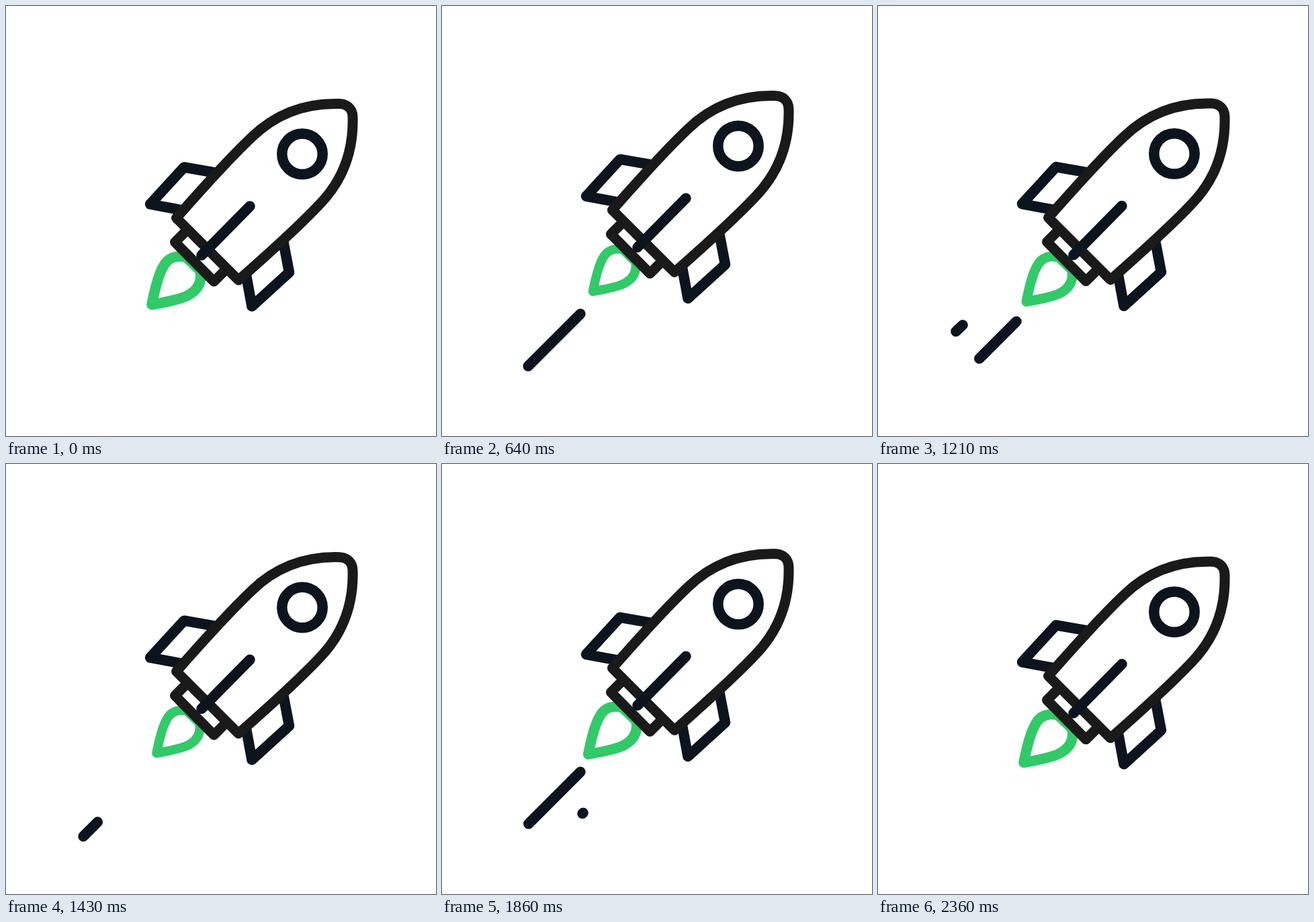
An HTML page that plays this animation: 640 by 640 pixels, repeating every 2430 ms.

```html
<!DOCTYPE html>
<html lang="en">
<head>
<meta charset="utf-8">
<title>Rocket</title>
<style>
html, body { margin: 0; height: 100%; overflow: hidden; background: #fff; }
svg { display: block; width: 100vw; height: 100vh; }
</style>
</head>
<body>
<svg viewBox="0 0 640 640" fill="none" stroke="#0d141e" stroke-width="15.5" stroke-linecap="round" stroke-linejoin="round">
  <g id="rocket">
    <g id="trails"></g>
    <path id="flame" stroke="#32c968" d="M217 444.500C221 424 227 400 234 388C241 374 254 370.500 268 374L289 394C292 410 286 422 272 430C262 436 240 440.500 217 444.500Z"/>
    <path d="M308 247.500L265 240L214.500 295L260 303.500M413 352L421.500 396.500L366 447L357.500 401"/>
    <g stroke="#1a1a1a" stroke-width="15">
      <path fill="#fff" d="M269 334L251.500 351.500L309.500 410L327 392.500"/>
      <path fill="#fff" d="M253.500 315.500C290 274 330 229 366 195C402 160 447 144 497 145.500C508 146 515.500 153.500 516 164.500C517.500 214.500 501.500 259.500 466.500 295.500C432.500 331.500 387.500 371.500 346 408Z"/>
    </g>
    <circle cx="441" cy="220.300" r="30.200"/>
    <path d="M363 298L291 371"/>
  </g>
</svg>
<script>
const LOOP = 2430, STEP = LOOP / 34, BOB = 1200;
const $ = id => document.getElementById(id);
const clamp = v => Math.min(1, Math.max(0, v));
const smooth = x => (1 - Math.cos(Math.PI * x)) / 2;

// each pass: [start in ms, part of the line that is reached]
const trails = [
  { from: [206, 470], to: [115, 561], passes: [[515, 1], [1124, 1], [1731, 1]] },
  { from: [162, 441], to: [98, 502], passes: [[-4, 1], [907, .72], [1455, .72]] },
  { from: [285, 457], to: [209, 532], passes: [[229, 1], [835, 1], [1511, 1], [1940, 1]] }
];
for (const trail of trails) {
  trail.el = document.createElementNS("http://www.w3.org/2000/svg", "path");
  $("trails").append(trail.el);
}

// [time, amount of shrinking]
const flicker = [[600, 1], [1210, .5], [1500, 1], [1900, .06], [2360, 0]];

function lift(t) {
  const p = t % BOB / (BOB / 2);
  return 12 * (p < 1 ? Math.sin(p * Math.PI / 2) : 1 - smooth(p - 1));
}

function shrink(t) {
  if (t < 600) return clamp(t / 480);
  const i = flicker.findIndex(k => k[0] > t);
  if (i < 1) return 0;
  const [t0, a] = flicker[i - 1], [t1, b] = flicker[i];
  return a + (b - a) * smooth((t - t0) / (t1 - t0));
}

function trailPath({ from, to, passes }, t) {
  const pass = passes.find(([start]) => t > start && t < start + 350);
  if (!pass) return "";
  const age = t - pass[0];
  const head = clamp(age / 150) * pass[1];
  const tail = clamp((age - 160) / 190) * pass[1];
  if (head < .05) return "";
  const at = u => from.map((v, i) => v + (to[i] - v) * u);
  return `M${at(tail)}L${at(head)}`;
}

function draw(now) {
  const t = Math.floor((now % LOOP + 5) / STEP) % 34 * STEP;
  $("rocket").setAttribute("transform", `translate(0 ${-lift(t)})`);
  $("flame").setAttribute("transform",
    `translate(279.5 380) scale(${1 - .122 * shrink(t)}) translate(-279.5 -380)`);
  for (const trail of trails) trail.el.setAttribute("d", trailPath(trail, t));
  requestAnimationFrame(draw);
}
draw(0);
</script>
</body>
</html>
```
